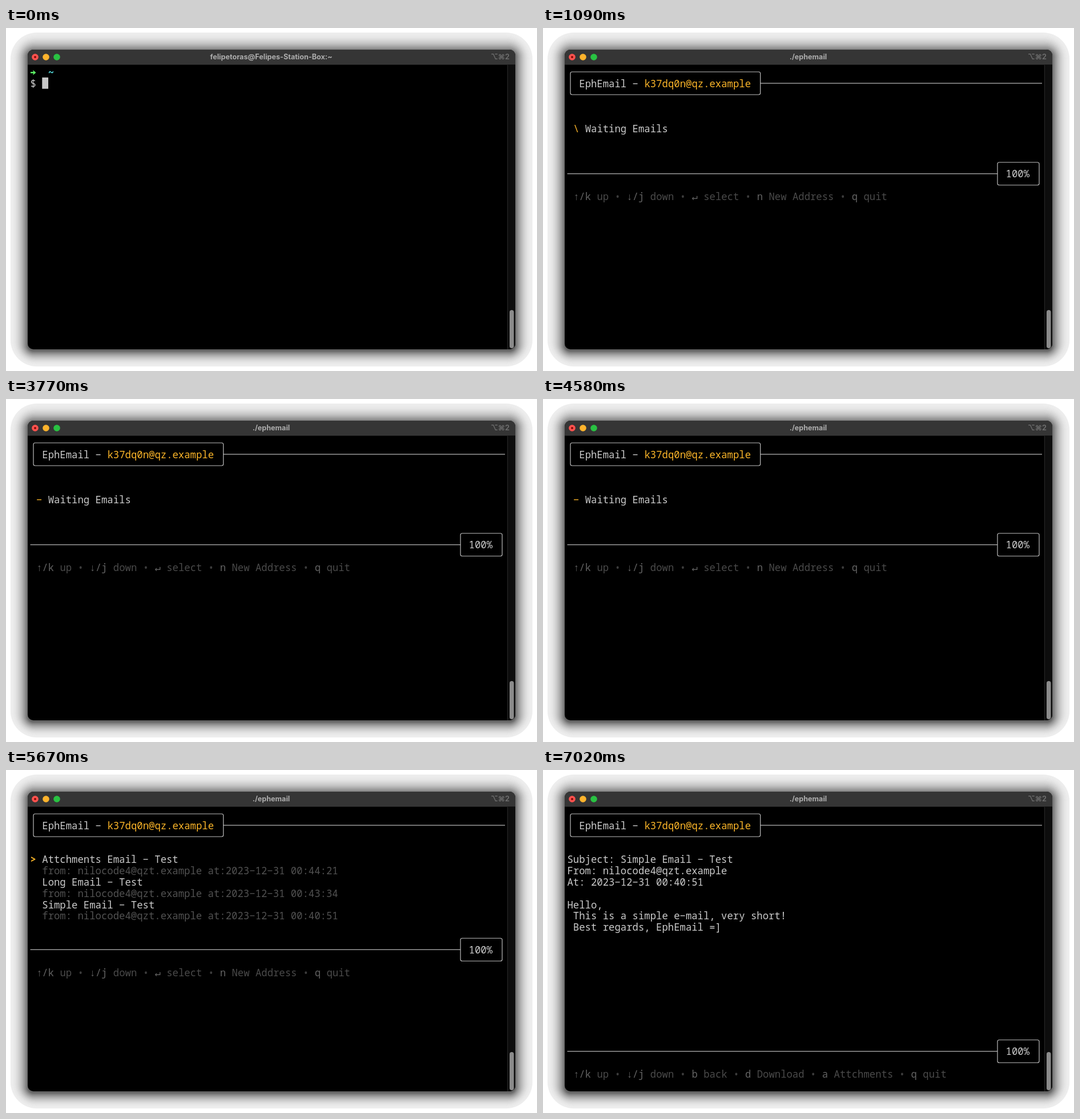
An HTML page with a canvas that plays this animation: 930x602 px, repeating every 8000 ms.

```html
<!DOCTYPE html>
<html lang="en">
<head>
<meta charset="utf-8">
<title>Terminal mail client</title>
<style>
  html, body { margin: 0; width: 100%; height: 100%; overflow: hidden; background: #fff; }
  canvas { display: block; }
</style>
</head>
<body>
<canvas id="stage" width="930" height="602"></canvas>
<script>
const ctx = document.getElementById('stage').getContext('2d');
const LOOP = 8000;
const CELL = 10.38, ROW = 19.83, LEFT = 42.5, BASELINE = 84;
const MONO = '17.3px "Noto Sans Mono", "DejaVu Sans Mono", monospace';
const FG = '#cbcbcb', YELLOW = '#fbb529', DIM = '#515151';
const KEY = '#626262', DESC = '#4a4a4a', SEP = '#3c3c3c';

const ADDRESS = 'k37dq0n@qz.example';
const SENDER = 'nilocode4@qzt.example';
const SHELL_TITLE = 'felipetoras@Felipes-Station-Box:~';
const COMMAND = './ephemail';
const SPINNER = '\\-|\\-/\\-/|-/|-/|\\';
const MAILS = [
  ['Attchments Email - Test', '2023-12-31 00:44:21'],
  ['Long Email - Test', '2023-12-31 00:43:34'],
  ['Simple Email - Test', '2023-12-31 00:40:51'],
];
const MOVE_KEYS = [['↑/k', 'up'], ['↓/j', 'down']];
const LIST_KEYS = [...MOVE_KEYS, ['↵', 'select'], ['n', 'New Address'], ['q', 'quit']];
const MAIL_KEYS = [...MOVE_KEYS, ['b', 'back'], ['d', 'Download'], ['a', 'Attchments'], ['q', 'quit']];

function box(x, y, w, h, r, fill) {
  ctx.beginPath();
  ctx.roundRect(x, y, w, h, r);
  ctx.fillStyle = fill;
  ctx.fill();
}

function frame(x, y, w, h) {
  ctx.beginPath();
  ctx.roundRect(x, y, w, h, 3);
  ctx.strokeStyle = '#bdbdbd';
  ctx.lineWidth = 1.2;
  ctx.stroke();
}

function rule(x1, x2, y) {
  ctx.fillStyle = '#bdbdbd';
  ctx.fillRect(x1, y - 0.6, x2 - x1, 1.2);
}

function dot(x, y, r, fill) {
  box(x - r, y - r, 2 * r, 2 * r, r, fill);
}

// Hyphens are drawn as wide dashes, as terminal fonts do.
function text(row, col, str, color = FG, weight = 500) {
  ctx.font = `${weight} ${MONO}`;
  ctx.textAlign = 'left';
  ctx.fillStyle = color;
  ctx.fillText(str.replaceAll('-', '−'), LEFT + col * CELL, BASELINE + row * ROW);
}

function label(str, x, align, color) {
  ctx.font = '700 12.6px Inter, sans-serif';
  ctx.textAlign = align;
  ctx.fillStyle = color;
  ctx.fillText(str, x, 55);
}

function drawWindow(title) {
  ctx.fillStyle = '#fff';
  ctx.fillRect(0, 0, 930, 602);
  for (let d = 30; d >= 0; d--) {
    const near = 1 - d / 30;
    const gray = Math.round(255 * (0.93 - 0.53 * near ** 2));
    box(38 - d, 38 - d + 3 * near, 854 + 2 * d, 526 + 2 * d, 10 + 1.2 * d, `rgb(${gray},${gray},${gray})`);
  }
  box(38, 38, 854, 526, 10, '#000');
  box(38, 38, 854, 26.5, [10, 10, 0, 0], '#353535');
  box(878, 64.5, 14, 499.5, [0, 0, 10, 0], '#0d0d0d');
  ctx.fillStyle = '#292929';
  ctx.fillRect(878, 64.5, 1, 499.5);
  box(882, 495, 7.5, 67, 3.75, '#8b8b8b');
  ['#ff524e', '#fdb32c', '#29c242'].forEach((c, i) => dot(51 + 19 * i, 51, 5.8, c));
  dot(51, 51, 2, '#860b08');
  label(title, 464.5, 'center', '#adadad');
  label('⌥⌘2', 882, 'right', '#6c6c6c');
}

function drawShell(t) {
  ctx.fillStyle = '#5ff967';
  ctx.fillRect(43, 77, 6, 2.4);
  ctx.beginPath();
  ctx.moveTo(47, 73.7);
  ctx.lineTo(52.5, 78.2);
  ctx.lineTo(47, 82.7);
  ctx.lineTo(48.4, 78.2);
  ctx.fill();
  text(0, 3, '~', '#60fdff', 700);
  text(1, 0, '$');
  if (t >= 270) text(1, 2, COMMAND);
  const [row, col] = t < 270 ? [1, 2] : t < 550 ? [1, 12] : [2, 0];
  ctx.fillStyle = '#c7c7c7';
  ctx.fillRect(LEFT + col * CELL, 67 + row * ROW, CELL + 0.4, ROW);
}

function drawHeader() {
  frame(48, 77, 332.7, 40);
  rule(380.7, 874, 97);
  text(1, 2, 'EphEmail -');
  text(1, 13, ADDRESS, YELLOW);
}

function drawFooter(row, keys) {
  const y = 77.3 + row * ROW;
  rule(42.5, 796, y);
  frame(796, y - 20, 73, 40);
  text(row, 74, '100%');
  let col = 1;
  keys.forEach(([key, desc], i) => {
    if (i) text(row + 2, col - 2, '•', SEP);
    text(row + 2, col, key, KEY);
    text(row + 2, col + key.length + 1, desc, DESC);
    col += key.length + desc.length + 4;
  });
}

function drawWaiting(t) {
  const tick = Math.min(SPINNER.length - 1, Math.floor((t - 1070) / 270));
  text(5, 1, SPINNER[tick], YELLOW);
  text(5, 3, 'Waiting Emails');
  drawFooter(9, LIST_KEYS);
}

function drawList(selected) {
  MAILS.forEach(([subject, date], i) => {
    text(4 + 2 * i, 2, subject);
    text(5 + 2 * i, 2, `from: ${SENDER} at:${date}`, DIM);
  });
  text(4 + 2 * selected, 0, '>', YELLOW, 700);
  drawFooter(12, LIST_KEYS);
}

function drawMail() {
  const [subject, date] = MAILS[2];
  [`Subject: ${subject}`, `From: ${SENDER}`, `At: ${date}`, '', 'Hello,',
    ' This is a simple e-mail, very short!', ' Best regards, EphEmail =]',
  ].forEach((line, i) => text(4 + i, 0, line));
  drawFooter(21, MAIL_KEYS);
}

function render(now) {
  const t = now % LOOP;
  drawWindow(t < 820 ? SHELL_TITLE : COMMAND);
  if (t < 1090) {
    drawShell(t);
  } else {
    drawHeader();
    if (t < 5670) drawWaiting(t);
    else if (t < 7020) drawList(t < 6210 ? 0 : 2);
    else drawMail();
  }
  requestAnimationFrame(render);
}

requestAnimationFrame(render);
</script>
</body>
</html>
```
